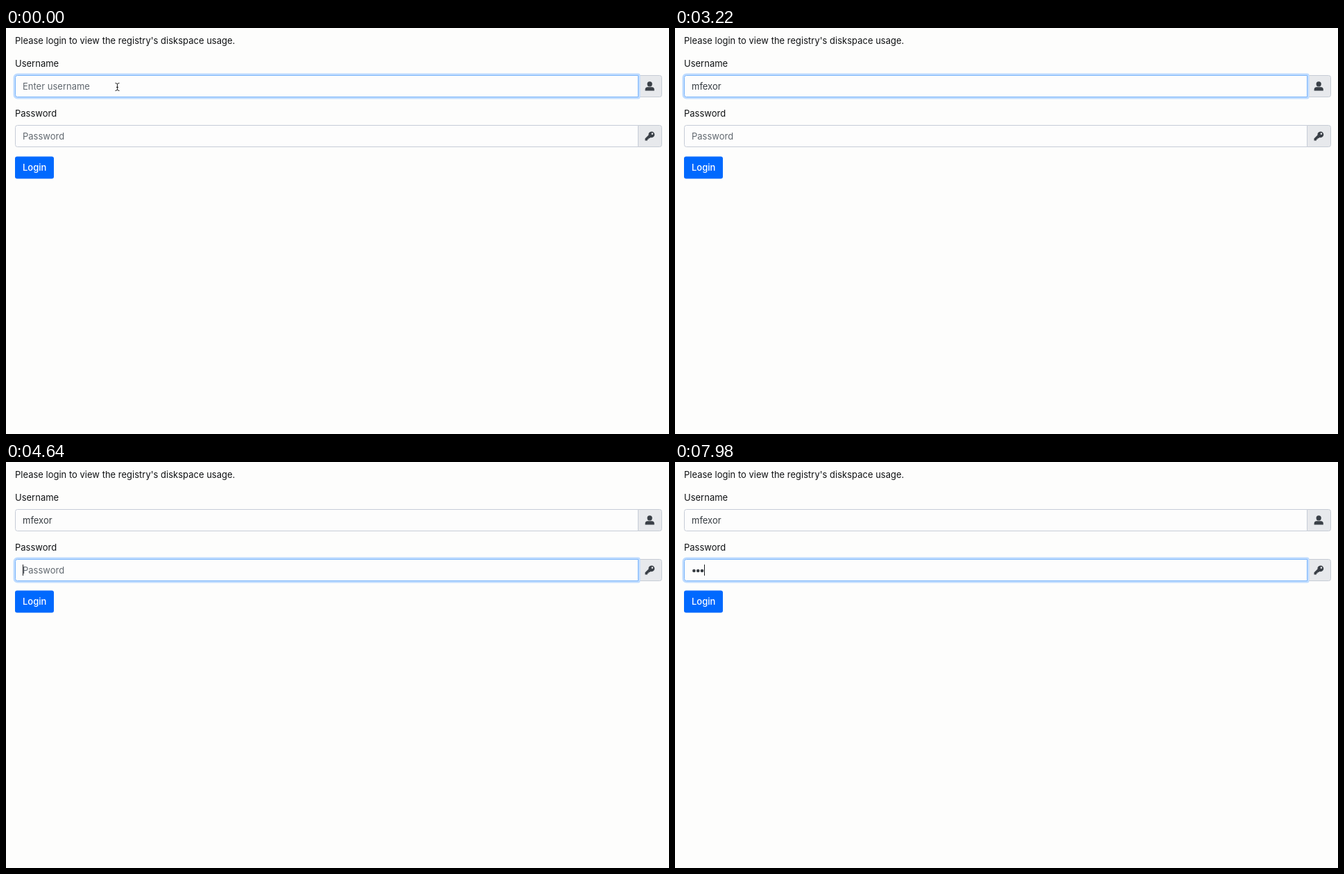
An HTML page that plays this animation: 956 by 586 pixels, repeating every 8 s.

```html
<!DOCTYPE html>
<html lang="en">
<head>
<meta charset="utf-8">
<title>Login form</title>
<style>
  html, body { margin: 0; width: 100%; height: 100%; overflow: hidden; background: #fdfdfc; }
  svg { display: block; width: 956px; height: 586px; }
  text { font: 13px Inter, "Open Sans", sans-serif; fill: #101214; white-space: pre; }
  .value { fill: #363c42; }
  .placeholder { fill: #61686f; }
  .button { fill: #fff; font-weight: 500; }
  .option { font-size: 10px; fill: #000; }
  .addon { fill: #e7e9ec; stroke: #c6ccd5; }
  .icon { fill: #3a4047; }
  .menu { filter: drop-shadow(0 1px 1px #0008) drop-shadow(0 3px 3px #0009); }
</style>
</head>
<body>
<svg viewBox="0 0 956 586">
  <text x="13" y="22.5">Please login to view the registry's diskspace usage.</text>
  <text x="13" y="56">Username</text>
  <text x="13" y="128">Password</text>

  <path class="addon" d="M911.5 68.5h31a3 3 0 0 1 3 3v25a3 3 0 0 1-3 3h-31z"/>
  <path class="addon" d="M911.5 140.5h31a3 3 0 0 1 3 3v25a3 3 0 0 1-3 3h-31z"/>
  <g class="icon">
    <circle cx="928.2" cy="80.9" r="3.6"/>
    <path d="M921.6 90.5v-1.6q0-3.6 3.7-3.6h5.8q3.7 0 3.7 3.6v1.6z"/>
    <path fill-rule="evenodd" d="M930.7 149.4a4.4 4.4 0 1 1-1.4 8.5l-1.3 1.3h-1.5v1.6h-1.6v1.7h-3.4v-2.9l5-5a4.4 4.4 0 0 1 4.2-5.2zm1.2 1.9a1.3 1.3 0 1 0 .01 0z"/>
  </g>

  <g id="fields"></g>

  <rect x="13" y="185.5" width="56" height="32" rx="3" fill="#0069fe"/>
  <text class="button" x="24" y="206">Login</text>

  <text id="userText" x="24" y="89"></text>
  <text id="passText" class="placeholder" x="24" y="161">Password</text>
  <g id="dots" class="value"></g>
  <rect id="caret" width="1" height="16" fill="#1c1f22"/>

  <g id="menu">
    <rect class="menu" x="13" y="100" width="899" height="17" fill="#fefefe"/>
    <text class="option" x="17.5" y="112.3">mfexor</text>
  </g>
  <path id="pointer" d="M157.5 79.5q3 0 3 2v7q0 2-3 2M163.5 79.5q-3 0-3 2v7q0 2 3 2M159 85.5h3" fill="none" stroke="#222"/>
</svg>

<script>
const LOOP = 8000;
const USER = "mfexor";
const TYPE_START = 900, TYPE_STEP = 260;
const MENU_END = 3220;
const TAB_TIME = 3340, FADE = 150;
const PASS_START = 7380, PASS_STEP = 260;
const BLINK = 610;
const DOT_STEP = 5.8;

const $ = id => document.getElementById(id);
const clamp = (v, lo, hi) => Math.min(hi, Math.max(lo, v));
const show = (node, on) => node.setAttribute("visibility", on ? "visible" : "hidden");
const typed = (t, start, step, max) => clamp(Math.floor((t - start) / step) + 1, 0, max);

function add(parent, tag, attrs) {
  const node = document.createElementNS("http://www.w3.org/2000/svg", tag);
  for (const key in attrs) node.setAttribute(key, attrs[key]);
  return parent.appendChild(node);
}

function makeField(y) {
  const path = `M911.5 ${y + .5}v31h-895a3 3 0 0 1-3-3v-25a3 3 0 0 1 3-3z`;
  const glow = add($("fields"), "path", { d: path, fill: "none", stroke: "#bfdcff", "stroke-width": 6, "stroke-linejoin": "round" });
  const box = add($("fields"), "path", { d: path, fill: "#fdfdfd" });
  return { glow, box };
}

const userField = makeField(68), passField = makeField(140);
const dots = [0, 1, 2].map(i => add($("dots"), "circle", { cx: 27.4 + i * DOT_STEP, cy: 157, r: 2.3 }));

function setFocus(field, amount) {
  const mix = (a, b) => Math.round(a + (b - a) * amount);
  field.glow.setAttribute("opacity", amount);
  field.box.setAttribute("stroke", `rgb(${mix(198, 122)},${mix(204, 180)},${mix(215, 250)})`);
}

function draw(t) {
  const letters = typed(t, TYPE_START, TYPE_STEP, USER.length);
  const bullets = typed(t, PASS_START, PASS_STEP, dots.length);
  const p = clamp((t - TAB_TIME) / FADE, 0, 1);
  const passFocus = p * p * (3 - 2 * p);
  setFocus(userField, 1 - passFocus);
  setFocus(passField, passFocus);

  const userText = $("userText");
  userText.textContent = letters ? USER.slice(0, letters) : "Enter username";
  userText.setAttribute("class", letters ? "value" : "placeholder");
  show($("passText"), !bullets);
  dots.forEach((dot, i) => show(dot, i < bullets));
  show($("menu"), letters && t < MENU_END);
  show($("pointer"), !letters);

  // The caret restarts its blink at every key press.
  const inPassword = t >= TAB_TIME;
  let lastKey = -BLINK, width = 0;
  if (inPassword) {
    lastKey = bullets ? PASS_START + (bullets - 1) * PASS_STEP : TAB_TIME;
    width = bullets * DOT_STEP;
  } else if (letters) {
    lastKey = TYPE_START + (letters - 1) * TYPE_STEP;
    width = userText.getComputedTextLength();
  }
  const caret = $("caret");
  caret.setAttribute("x", Math.round(24.4 + width));
  caret.setAttribute("y", inPassword ? 148 : 76);
  show(caret, Math.floor((t - lastKey) / BLINK) % 2 === 0);
}

const start = performance.now();
function tick() {
  draw((performance.now() - start) % LOOP);
  requestAnimationFrame(tick);
}
tick();
</script>
</body>
</html>
```
